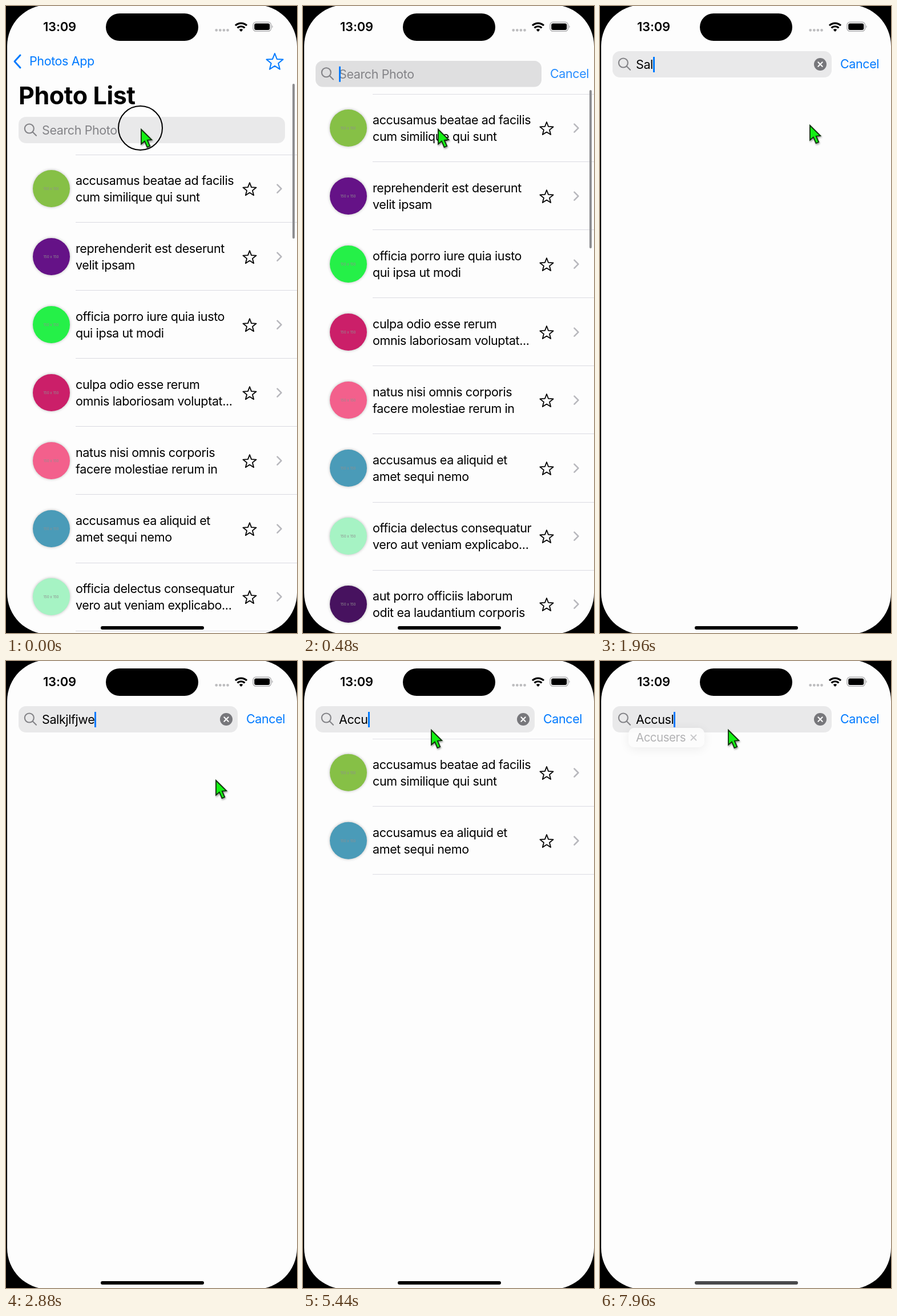
An HTML page for the animation above (8 s loop, 510 px wide and 1097 px high).

```html
<!DOCTYPE html>
<html lang="en">
<head>
<meta charset="utf-8">
<title>Photo List</title>
<style>
  html, body { margin: 0; width: 100%; height: 100%; overflow: hidden; background: #000; }
  body { position: relative; font: 21.5px/29px Inter, "Liberation Sans", sans-serif; letter-spacing: -.39px; color: #000; }
  body *, svg { position: absolute; white-space: nowrap; }
  svg { overflow: visible; left: 0; top: 0; width: 1px; height: 1px; fill: none; stroke-linecap: round; stroke-linejoin: round; }
  [hidden] { display: none !important; }
  .anim { animation: 8s linear infinite; }

  #screen { left: 2px; top: -2px; width: 508px; height: 1101px; border-radius: 72px; background: #fdfdfd; overflow: hidden; }
  #ui { left: -2px; top: 2px; width: 510px; height: 1097px; }

  #time { left: 65px; top: 22px; font-size: 22px; font-weight: 600; letter-spacing: -.2px; }
  #island { left: 175px; top: 13px; width: 162px; height: 48px; border-radius: 24px; background: #000; }
  #home { left: 166px; top: 1085px; width: 181px; height: 6px; border-radius: 3px; background: #000; animation-name: dim; }

  #nav { animation-name: leave; }
  #back { left: 41px; top: 82px; color: #007aff; }
  #title { left: 22px; top: 130px; font-size: 43px; line-height: 52px; font-weight: 700; letter-spacing: -.4px; }

  #field { left: 22px; top: 194px; width: 467px; height: 46px; border-radius: 13px; background: #e9e9ea; animation-name: lift, shrink, press; }
  #hint, #typed { left: 41px; top: 9px; height: 29px; }
  #hint { color: #838387; }
  #caret { left: 100%; top: 1px; width: 2.5px; height: 27px; background: #007aff; opacity: 0; animation-name: blink; animation-timing-function: step-end; }
  #clear { right: 9px; top: 12px; width: 22px; height: 22px; border-radius: 50%; background: #77777b; }
  #cancel { left: calc(100% + 15px); top: 8px; color: #007aff; opacity: 0; animation-name: appear; }

  #list { top: 259.5px; width: 510px; height: 0; animation-name: raise; }
  #list::before, .row::after { content: ""; position: absolute; left: 122px; right: 0; height: 1px; background: #dadae1; }
  .row { left: 0; width: 510px; height: 119.1px; }
  .row::after { bottom: -.5px; }
  .row p { left: 122px; top: 31px; margin: 0; }
  .thumb { left: 46.5px; top: 27px; width: 65px; height: 65px; border-radius: 50%; box-shadow: 0 0 5px #0004;
    font-size: 6.2px; line-height: 65px; letter-spacing: 0; text-align: center; color: #8f8f8f; }

  #bar { left: 502px; top: 136px; width: 4px; height: 271px; border-radius: 2px; background: #8e8e90; animation-name: bar; }

  #bubble { left: 50px; top: 117px; width: 133px; height: 34px; border-radius: 10px; background: #fcfcfce6; box-shadow: 0 3px 18px #00000012;
    opacity: 0; animation-name: suggest; font-size: 20.5px; letter-spacing: -.5px; color: #b2b2b4; }
  #bubble span { left: 13px; top: 2px; }

  #pointer { animation-name: travel; animation-timing-function: ease-in-out; }
  #arrow { top: 1px; filter: drop-shadow(1px 2px 1.5px #0006); }
  #ring { left: -41px; top: -41.5px; width: 75px; height: 75px; border: 2px solid #000; border-radius: 50%; animation-name: click; animation-timing-function: step-end; }

  @keyframes leave { 0%, 2.9% { opacity: 1 } 3.8%, 100% { opacity: 0 } }
  @keyframes lift {
    0%, 3% { transform: none; animation-timing-function: ease-in-out }
    7.1%, 100% { transform: translateY(-115px) }
  }
  @keyframes raise {
    0%, 3% { transform: none; animation-timing-function: ease-in-out }
    7.1%, 100% { transform: translateY(-124.2px) }
  }
  @keyframes shrink {
    0%, 3% { width: 467px; animation-timing-function: ease-in-out }
    7.1%, 100% { width: 384px }
  }
  @keyframes press { 0%, 1.5% { background: #e9e9ea } 3%, 5% { background: #d9d9da } 7.5%, 100% { background: #e9e9ea } }
  @keyframes appear {
    0%, 3% { opacity: 0; animation-timing-function: ease-in-out }
    7.1%, 100% { opacity: 1 }
  }
  @keyframes bar {
    0%, 3% { top: 136px; height: 271px }
    3.8%, 15% { top: 147px; height: 277px; opacity: 1 }
    18%, 100% { top: 147px; height: 277px; opacity: 0 }
  }
  @keyframes blink {
    0%, 10.5%, 37.5%, 51%, 68.75%, 81.25% { opacity: 0 }
    3.5%, 16.5%, 44.5%, 55%, 75%, 87%, 100% { opacity: 1 }
  }
  @keyframes travel {
    0%, 6% { transform: translate(237px, 215px) }
    12.5%, 14% { transform: translate(355px, 242px) }
    18%, 36.5% { transform: translate(368px, 208px) }
    42%, 45.5% { transform: translate(387px, 103px) }
    47%, 48% { transform: translate(405px, 122px) }
    53%, 100% { transform: translate(225px, 120px) }
  }
  @keyframes click { 0%, 43% { opacity: 1 } 2%, 45%, 100% { opacity: 0 } }
  @keyframes suggest { 0%, 97.5% { opacity: 0 } 99.3%, 100% { opacity: 1 } }
  @keyframes dim { 0%, 97.5% { background: #000 } 99.3%, 100% { background: #4a4a4c } }
</style>
</head>
<body>
<div id="screen"><div id="ui">
  <div id="list" class="anim"></div>

  <div id="nav" class="anim">
    <svg><path d="M25 86 L15 97 L25 108" stroke="#007aff" stroke-width="3"/><path id="favorites" stroke="#007aff" stroke-width="2"/></svg>
    <div id="back">Photos App</div>
    <div id="title">Photo List</div>
  </div>

  <div id="field" class="anim">
    <svg stroke="#838387" stroke-width="2.1"><circle cx="18.8" cy="20.5" r="8"/><path d="M24.8 26.5 L31 32.7"/></svg>
    <div id="hint">Search Photo</div>
    <div id="typed"><span id="text" style="position:static"></span><i id="caret" class="anim"></i></div>
    <div id="clear"><svg stroke="#fff" stroke-width="2"><path d="M7.3 7.3 L14.7 14.7 M14.7 7.3 L7.3 14.7"/></svg></div>
    <div id="cancel" class="anim">Cancel</div>
  </div>

  <div id="bubble" class="anim">
    <span>Accusers</span>
    <svg stroke="#c8c8ca" stroke-width="1.8"><path d="M109.5 12.5 L118.5 21.5 M118.5 12.5 L109.5 21.5"/></svg>
  </div>

  <div id="time">13:09</div>
  <div id="island"></div>
  <svg>
    <path d="M368.7 42.3h.01m6.6 0h.01m6.6 0h.01m6.6 0h.01" stroke="#bdbdbf" stroke-width="4.8"/>
    <g stroke="#000" stroke-width="3.2" stroke-linecap="butt">
      <path d="M402 34.2 A14.3 14.3 0 0 1 422 34.2"/>
      <path d="M405.6 38.4 A9 9 0 0 1 418.4 38.4"/>
    </g>
    <path d="M412 45 L408.7 41.6 A4.8 4.8 0 0 1 415.3 41.6 Z" fill="#000"/>
    <rect x="433" y="28.2" width="31.5" height="16" rx="5" stroke="#a3a3a5" stroke-width="1.3"/>
    <rect x="435.2" y="30.4" width="27.1" height="11.6" rx="3" fill="#000"/>
    <path d="M466.3 33.6 Q469 36.2 466.3 38.8 Z" fill="#a3a3a5"/>
  </svg>
  <div id="bar" class="anim"></div>
  <div id="home" class="anim"></div>
</div></div>

<div id="pointer" class="anim">
  <svg id="arrow"><path d="M0 0 V25.5 L6 20.5 L10.5 31 L15.2 29 L10.8 18.7 L18.3 18 Z" fill="#14f014" stroke="#10300c" stroke-width="1.8" stroke-linejoin="miter"/></svg>
  <div id="ring" class="anim"></div>
</div>

<script>
  const LOOP = 8000;
  const photos = [
    ["#86c046", "accusamus beatae ad facilis", "cum similique qui sunt"],
    ["#651287", "reprehenderit est deserunt", "velit ipsam"],
    ["#25f048", "officia porro iure quia iusto", "qui ipsa ut modi"],
    ["#cb1f69", "culpa odio esse rerum", "omnis laboriosam voluptat..."],
    ["#f3608c", "natus nisi omnis corporis", "facere molestiae rerum in"],
    ["#4a9bb8", "accusamus ea aliquid et", "amet sequi nemo"],
    ["#a6f3c4", "officia delectus consequatur", "vero aut veniam explicabo..."],
    ["#47125f", "aut porro officiis laborum", "odit ea laudantium corporis"]
  ];
  // Each run types its keys after a base text, one every step ms.
  const runs = [
    { from: 0, step: 1, base: "", keys: "" },
    { from: 1760, step: 80, base: "", keys: "Salkjlfjwe" },
    { from: 3560, step: 1, base: "", keys: "" },
    { from: 4440, step: 160, base: "", keys: "Accu" },
    { from: 7000, step: 320, base: "Accu", keys: "sl" }
  ];
  const $ = id => document.getElementById(id);

  function star(cx, cy, radius) {
    const points = Array.from({ length: 10 }, (_, i) => {
      const r = i % 2 ? radius * .43 : radius, a = (i / 5 - .5) * Math.PI;
      return (cx + r * Math.cos(a)).toFixed(2) + " " + (cy + r * Math.sin(a)).toFixed(2);
    });
    return "M" + points.join("L") + "Z";
  }

  $("favorites").setAttribute("d", star(471, 98.3, 15.3));
  $("list").innerHTML = photos.map(([color, first, second]) => `
    <div class="row">
      <div class="thumb" style="background:${color}">150 x 150</div>
      <p>${first}<br style="position:static">${second}</p>
      <svg><path d="${star(427, 61.3, 12.2)}" stroke="#000" stroke-width="1.8"/>
      <path d="M475.5 52.7 L482.5 59.7 L475.5 66.7" stroke="#b8b8bd" stroke-width="2.6"/></svg>
    </div>`).join("");
  const rows = [...document.querySelectorAll(".row")];

  function textAt(t) {
    const run = runs.filter(r => r.from <= t).pop();
    return run.base + run.keys.slice(0, Math.floor((t - run.from) / run.step) + 1);
  }

  let shown = null;
  function show(text) {
    if (text === shown) return;
    shown = text;
    $("text").textContent = text;
    $("hint").hidden = text !== "";
    $("clear").hidden = text === "";
    let count = 0;
    rows.forEach((row, i) => {
      const match = photos[i].slice(1).join(" ").includes(text.toLowerCase());
      row.hidden = !match;
      if (match) row.style.top = count++ * 119.1 + "px";
    });
    // display: none would restart the list's animation
    $("list").style.visibility = count ? "visible" : "hidden";
  }

  const start = performance.now();
  function tick() {
    show(textAt((performance.now() - start) % LOOP));
    requestAnimationFrame(tick);
  }
  tick();
</script>
</body>
</html>
```
